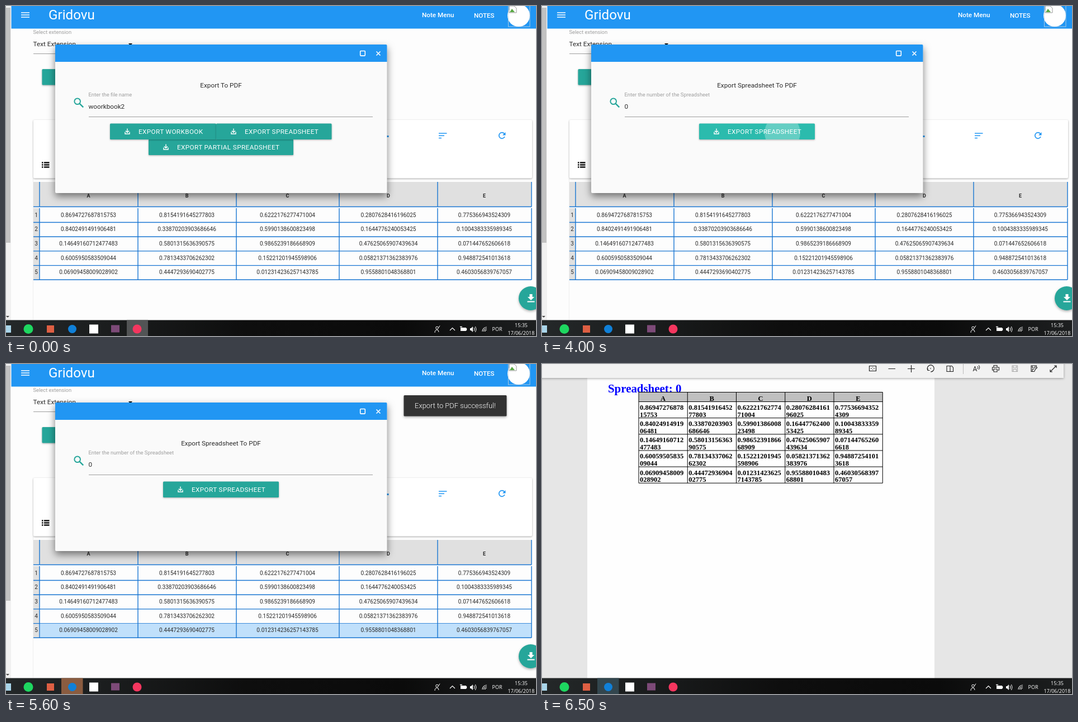
Animation, 948 px wide and 591 px high, one loop 8000 ms. Source, as an HTML page:

```html
<!DOCTYPE html>
<html lang="en">
<head>
<meta charset="utf-8">
<title>Export to PDF</title>
<style>
  html, body { margin: 0; width: 100%; height: 100%; overflow: hidden; background: #fdfdfd; }
  svg { display: block; width: 948px; height: 591px; }
  text { font: 11.75px Roboto, sans-serif; fill: #2b2b2b; white-space: pre; }
  .mid { text-anchor: middle; }
  .nav { font-size: 11.7px; font-weight: 500; fill: #fff; }
  .label { font-size: 9.4px; fill: #9e9e9e; }
  .cell { font-size: 10.08px; text-anchor: middle; }
  .head { font-size: 9px; font-weight: 700; text-anchor: middle; }
  .btn { filter: drop-shadow(0 1.5px 1.5px rgba(0,0,0,.3)); }
  .btn text { fill: #fff; letter-spacing: .37px; }
  .tray { font: 9px "Open Sans", sans-serif; fill: #fff; text-anchor: middle; }
  .pdf { font: bold 12.5px "Liberation Serif", serif; fill: #000; }
  .line { fill: none; stroke: currentColor; }
</style>
</head>
<body>
<svg id="stage" viewBox="0 0 948 591"></svg>
<script>
const LOOP = 8000, TEAL = '#26a69a', BLUE = '#2196f3', GRID = '#1976d2';
const LETTERS = [...'ABCDE'];
const DATA = [
  '0.8694727687815753 0.8154191645277803 0.6222176277471004 0.2807628416196025 0.775366943524309',
  '0.8402491491906481 0.33870203903686646 0.5990138600823498 0.1644776240053425 0.1004383335989345',
  '0.14649160712477483 0.5801315636390575 0.9865239186668909 0.47625065907439634 0.071447652606618',
  '0.6005950583509044 0.7813433706262302 0.15221201945598906 0.05821371362383976 0.948872541013618',
  '0.06909458009028902 0.4447293690402775 0.012314236257143785 0.9558801048368801 0.4603056839767057'
].map(row => row.split(' '));

const rect = (x, y, w, h, fill, more = '') => `<rect x="${x}" y="${y}" width="${w}" height="${h}" fill="${fill}" ${more}/>`;
const text = (x, y, s, cls = '', more = '') => `<text x="${x}" y="${y}" class="${cls}" ${more}>${s}</text>`;
const line = (d, color, width = 1, more = '') => `<path d="${d}" class="line" color="${color}" stroke-width="${width}" ${more}/>`;
const circle = (x, y, r, fill, more = '') => `<circle cx="${x}" cy="${y}" r="${r}" fill="${fill}" ${more}/>`;
const group = (id, body, more = '') => `<g id="${id}" ${more}>${body}</g>`;

const button = (id, x, y, w, label) => `<g class="btn">
  ${rect(x, y, w, 28.5, TEAL, `id="${id}" rx="1.5"`)}
  ${line(`M${x + 31} ${y + 9}v7m-3 -3l3 3l3 -3m-7 2v3.5h8v-3.5`, '#fff', 1.4)}
  ${text(x + 51, y + 18.5, label)}</g>`;

// spreadsheet page
const edges = [60, 236, 412, 596, 772, 940];
const centers = [147.5, 323.5, 503.5, 684, 855.5];
const rowTop = r => 362 + r * 25.7;

const sheet = () => rect(49, 315, 891, 44, '#e0e0e0') + rect(49, 362, 11, 128, '#e0e0e0') +
  DATA.map((row, r) => rect(61, rowTop(r), 879, 25, '#c0e0fb', `id="row${r}"`) +
    text(54, rowTop(r) + 15.5, r + 1, 'cell') +
    row.map((v, c) => text(centers[c], rowTop(r) + 15.5, v, 'cell')).join('') +
    line(`M49 ${rowTop(r) + 25.5}H940`, GRID, 1.4)).join('') +
  LETTERS.map((s, c) => text(centers[c], 343, s, 'head')).join('') +
  edges.map(x => line(`M${x} 315V359.5M${x} 362V490`, GRID, 1.4)).join('') +
  line('M49 359.5H940', GRID, 1.4);

const page = () => rect(0, 0, 948, 591, '#fdfdfd') +
  rect(0, 0, 9, 563, '#f1f1f1') + rect(0, 3, 8, 421, '#c1c1c1') + '<path d="M0 555h6l-3 3z" fill="#444"/>' +
  rect(9.5, 0, 939, 40.5, BLUE) + line('M27 12H42M27 16H42M27 20H42', '#fff', 1.7) +
  text(76, 24, 'Gridovu', '', 'style="font-size:24.2px;fill:#fff"') +
  text(744, 20, 'Note Menu', 'nav') + text(837, 20.5, 'NOTES', 'nav') +
  circle(917, 17, 20, '#fff') + rect(898.5, -2, 38.5, 39, 'none', 'stroke="#c8d6e0" stroke-width=".8"') +
  '<path d="M900 0h9l4 4v8h-13z" fill="#fff" stroke="#999"/><path d="M901 11l4 -6l5 6z" fill="#5aa845"/>' +
  text(48.5, 49.5, 'Select extension', 'label') + text(48.5, 71.5, 'Text Extension') +
  '<path d="M219 67h7l-3.5 4z" fill="#000"/>' + line('M49 85.5H300', '#9e9e9e') +
  rect(64.5, 113, 60, 28.5, TEAL, 'rx="1.5" class="btn"') +
  line('M48.5 309V562', '#eee') +
  rect(49, 204, 892, 104.5, '#fff', 'rx="2" style="filter:drop-shadow(0 1px 1.5px rgba(0,0,0,.35))"') +
  line('M64 280.5h2.5m1.5 0h9.5M64 284.5h2.5m1.5 0h9.5M64 288.5h2.5m1.5 0h9.5', '#111', 2.7) +
  line('M774 228H788.5M774 232.3H784M774 236.5H779', BLUE, 1.6) +
  line('M891.5 229A5.3 5.3 0 1 0 892 234', BLUE, 1.7) + '<path d="M893.5 226v5.5h-5.5z" fill="#2196f3"/>' +
  rect(675, 232, 9.5, 3, BLUE) + sheet() +
  circle(938.5, 523.5, 21.5, TEAL, 'style="filter:drop-shadow(0 2px 2px rgba(0,0,0,.3))"') +
  '<path d="M936.500 516h5v5h3.500l-6 6l-6 -6h3.500zM932.500 528.500h13v2h-13z" fill="#fff"/>';

// export dialog
const dialog = () => rect(88, 69, 593.5, 266, '#fafafa', 'rx="2" style="filter:drop-shadow(0 6px 7px rgba(0,0,0,.5))"') +
  '<path d="M88 100V71q0 -2 2 -2H679.500q2 0 2 2V100z" fill="#2196f3"/>' +
  rect(633.7, 80.5, 8.6, 8.6, 'none', 'rx="1" stroke="#fff" stroke-width="1.6"') +
  line('M662.5 81.500l7 7m0 -7l-7 7', '#fff', 1.6) +
  circle(127.7, 170.8, 5.3, 'none', `stroke="${TEAL}" stroke-width="2"`) + line('M131.700 174.800l6.500 6.500', TEAL, 2.4) +
  text(384.5, 146, '', 'mid', 'id="title"') + text(147.5, 162.3, '', 'label', 'id="label"') +
  text(147.5, 184.3, '', '', 'id="entry"') +
  line('', '#e53935', 1.2, 'id="squiggle" stroke-dasharray="2 1.2"') + line('', '#111', 1, 'id="caret"') +
  line('M148 198.500H656', '#9e9e9e', 1, 'id="underline"') +
  group('choices', button('partial', 255, 238.5, 259, 'EXPORT PARTIAL SPREADSHEET') +
    button('workbook', 186, 210.5, 190, 'EXPORT WORKBOOK') + button('spreadsheet', 376, 210.5, 206.5, 'EXPORT SPREADSHEET')) +
  group('confirm', button('go', 281, 210.5, 207, 'EXPORT SPREADSHEET') +
    `<clipPath id="goClip">${rect(281, 210.5, 207, 28.5, '#fff', 'rx="1.5"')}</clipPath>` +
    `<g clip-path="url(#goClip)">${circle(430, 227, 0, '#fff', 'id="ripple"')}</g>`);

const toast = () => group('toast', rect(711.5, 56, 184, 37.5, '#323232', 'rx="1.5" style="filter:drop-shadow(0 2px 2px rgba(0,0,0,.3))"') +
  text(803.5, 79, 'Export to PDF successful!', 'mid', 'style="font-size:12.9px;font-weight:300;fill:#fff"'));

// document viewer
const colX = c => 173 + c * 87.25, docY = r => 67.5 + r * 29.15;

const viewer = () => rect(0, 0, 948, 591, '#e6e6e6') + rect(81, 20, 621, 545, '#fefefe') +
  rect(-9, -9, 942, 34, '#f2f2f2', 'style="filter:drop-shadow(0 1px 2px rgba(0,0,0,.35))"') +
  line('M585.500 3.500h12v9h-12zM588 8h2m3 0h2M591.500 5.500v1m0 3v1', '#222', 1.2) +
  line('M619.500 8.500h12.500M654 8.500h13M660.500 2v13', '#222', 1.2) +
  line('M690 11a6 6 0 1 1 5 3m-5 -6v3.500h3.500M694 8h2', '#222', 1.2) +
  line('M724 3.500h6v10h-6zM730 3.500h3l2.500 3v7h-5.500', '#222', 1.1) + line('M753.500 0V18', '#bbb') +
  text(770.5, 13, 'A', '', 'style="font-size:12px"') + line('M779 4q2 2 0 5m2 -7q3.500 4 0 8', '#222') +
  line('M808 6V2.500h6V6M808 11h-2.500V6h12v5h-2.500M808 9h6v5h-6z', '#222', 1.1) +
  line('M841 3h9.500v10.500h-9.500zM843 3v4h5.500V3M843 13v-3.500h5.500V13', '#aaa', 1.1) +
  line('M881 13.500h-6V3h9.500v3.500M877 3v4h5V3M877 13v-3.500h3M881 13l1 -3l4 -4', '#222', 1.1) +
  line('M909 14l11 -11m-4 0h4v4M909 10v4h4', '#222', 1.2) +
  text(118, 51, 'Spreadsheet: 0', 'pdf', 'style="font-size:20.9px;fill:#00f"') +
  rect(173, 50.5, 436.5, 17, '#c0c0c0') +
  LETTERS.map((s, c) => text(colX(c) + 43.5, 65.5, s, 'pdf mid')).join('') +
  DATA.map((row, r) => row.map((v, c) =>
    text(colX(c) + 2, docY(r) + 14.5, v.slice(0, 13), 'pdf') +
    text(colX(c) + 2, docY(r) + 27, v.slice(13), 'pdf')).join('')).join('') +
  [0, 1, 2, 3, 4, 5].map(i => line(`M${colX(i)} 50.5V213.3M173 ${docY(i)}H609.3`, '#000')).join('') +
  line('M173 50.500H609.300', '#000');

const taskbar = () => '<linearGradient id="bar"><stop stop-color="#242829"/><stop offset=".45" stop-color="#0e0e0e"/><stop offset=".75" stop-color="#0b0b0b"/><stop offset="1" stop-color="#1d1f20"/></linearGradient>' +
  rect(0, 562.5, 948, 29, 'url(#bar)') +
  rect(216, 562.5, 38, 29, '#525455', 'id="recorder"') + rect(99, 562.5, 38.5, 29, '#000', 'id="browser"') +
  rect(-5, 572, 14, 13, '#a9d5ea') + circle(40, 578.5, 8.5, '#1ed760') + rect(73, 572, 13, 13, '#de5f43') +
  circle(118.5, 578.5, 7.5, '#1080d8') + rect(149, 570.5, 16, 16, '#fff') + rect(188, 571.5, 15, 13, '#7d4a78') +
  circle(234.5, 578.5, 8, '#f5365f') +
  line('M767 585q0 -5 4 -5q3 0 3 4M776 572.500l-2.500 4', '#fff') + circle(771, 576.5, 2.3, 'none', 'stroke="#fff"') +
  line('M794 581l4.500 -4.500l4.500 4.500', '#fff', 1.2) +
  rect(813, 576, 10, 6, '#fff') + line('M812 574.500h4M823.500 577v4', '#fff', 1.4) +
  '<path d="M830 577h2l3 -3v10l-3 -3h-2z" fill="#fff"/>' + line('M837 576q2 3 0 6m2.500 -8q3 5 0 10', '#fff') +
  line('M852 583a8 8 0 0 1 8 -8M854.500 583a5.500 5.500 0 0 1 5.500 -5.500M857 583a3 3 0 0 1 3 -3', '#ddd', 1.2) +
  text(878.5, 582, 'POR', 'tray') + text(921.5, 574.5, '15:35', 'tray') + text(921.5, 589, '17/06/2018', 'tray');

document.getElementById('stage').innerHTML = page() + dialog() + toast() + group('viewer', viewer()) + taskbar();

const el = id => document.getElementById(id);
const set = (id, attrs) => { for (const k in attrs) el(id).setAttribute(k, attrs[k]); };
const show = (id, on) => set(id, { opacity: +on });
const ramp = (t, from, to) => Math.min(1, Math.max(0, (t - from) / (to - from)));
const within = (t, from, to) => t >= from && t < to;
// last value whose start time has passed
const at = (t, steps) => steps.filter(([start]) => start <= t).pop()[1];
const mix = (a, b, k) => `rgb(${a.map((v, i) => Math.round(v + (b[i] - v) * k))})`;
const GREY = [158, 158, 158], TEAL_RGB = [38, 166, 154], HOVER = [43, 187, 173];

function render(time) {
  const t = Math.floor(time / 100) * 100;
  const second = t >= 3300;
  const focus = t < 3200 ? ramp(t, 500, 800) : 0;
  const word = at(t, [[0, 'woorkbook2'], [1100, 'woorkbook'], [1500, 'woorkbookS'], [1700, 'woorkbookSP'], [2000, 'woorkbookSP0'], [3300, '0']]);

  el('title').textContent = second ? 'Export Spreadsheet To PDF' : 'Export To PDF';
  el('label').textContent = second ? 'Enter the number of the Spreadsheet' : 'Enter the file name';
  el('entry').textContent = word;
  const tint = mix(GREY, TEAL_RGB, focus);
  el('label').style.fill = tint;
  set('underline', { color: tint, 'stroke-width': 1 + focus * .6 });

  const end = 147.5 + el('entry').getComputedTextLength();
  set('caret', { d: `M${end + .5} 173.5V187` });
  show('caret', within(t, 700, 2400) || within(t, 2900, 3200));
  set('squiggle', { d: `M148 187H${end}`, color: t < 2900 ? '#e53935' : '#c9c9c9' });
  show('squiggle', within(t, 700, 1100) || within(t, 2400, 3200));

  show('choices', !second);
  show('confirm', second);
  set('spreadsheet', { fill: mix(TEAL_RGB, HOVER, ramp(t, 2900, 3100)) });
  set('go', { fill: mix(HOVER, TEAL_RGB, ramp(t, 5150, 5400)) });
  set('ripple', { r: 160 * ramp(t, 3900, 4400), opacity: .27 * (1 - ramp(t, 4600, 4900)) });

  const rise = 1 - (1 - ramp(t, 4480, 4780)) ** 3;
  set('toast', { opacity: rise, transform: `translate(0 ${35 * (1 - rise)})` });

  const hovered = at(t, [[0, -1], [5200, 0], [5300, 3], [5500, 4], [5700, -1]]);
  DATA.forEach((_, r) => show('row' + r, r === hovered));

  show('recorder', t < 600);
  show('browser', within(t, 4500, 4900) || t >= 5600);
  set('browser', { fill: at(t, [[0, '#70523c'], [5600, '#8a5c40'], [5900, '#9f6741'], [6400, '#33464e']]) });
  set('viewer', { opacity: ramp(t, 6300, 6500) });
}

const start = performance.now();
(function tick() {
  render((performance.now() - start) % LOOP);
  requestAnimationFrame(tick);
})();
</script>
</body>
</html>
```
